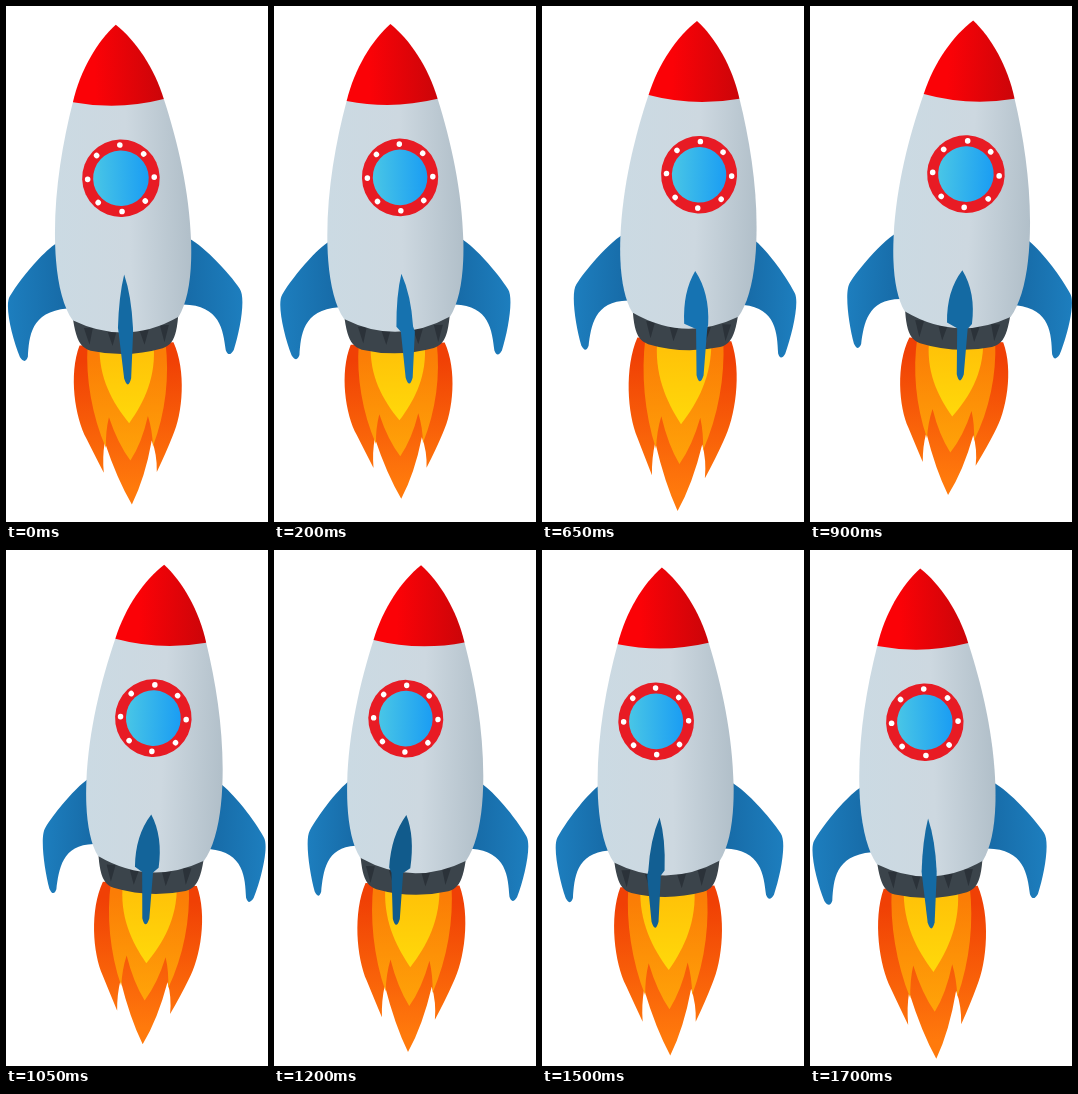
Animation, 262 px wide and 516 px high, one loop 1.75 s. Source, as an HTML page:

```html
<!DOCTYPE html>
<html lang="en">
<head>
<meta charset="utf-8">
<title>Rocket</title>
<style>
  html, body { margin: 0; width: 100%; height: 100%; overflow: hidden; background: #fff; }
  svg { display: block; width: 100vw; height: 100vh; }
</style>
</head>
<body>
<svg viewBox="0 0 262 516">
  <defs>
    <linearGradient id="hull"><stop stop-color="#cbdae3"/><stop offset=".55" stop-color="#cdd8e0"/><stop offset="1" stop-color="#b1bfc9"/></linearGradient>
    <linearGradient id="red"><stop offset=".25" stop-color="#fb0207"/><stop offset="1" stop-color="#cb0509"/></linearGradient>
    <linearGradient id="glass"><stop stop-color="#49c6e6"/><stop offset="1" stop-color="#1a9df3"/></linearGradient>
    <linearGradient id="blue"><stop stop-color="#1565a0"/><stop offset="1" stop-color="#1d7ebe"/></linearGradient>
    <linearGradient id="fire" x2="0" y2="1"><stop offset=".1" stop-color="#f04005"/><stop offset=".9" stop-color="#ff7a0c"/></linearGradient>
    <linearGradient id="glow" x2="0" y2="1"><stop offset=".1" stop-color="#fb7d06"/><stop offset="1" stop-color="#ffa408"/></linearGradient>
    <linearGradient id="core" x2="0" y2="1"><stop offset=".1" stop-color="#ffc208"/><stop offset="1" stop-color="#ffd90a"/></linearGradient>
    <path id="sideFin" fill="url(#blue)" d="M-15 232H9C24 241 48 268 58 284C64 293 57 326 50 345Q45 353 42 345C40 325 38 300 1 298H-15Z"/>
  </defs>
  <g id="rocket">
    <g id="flame">
      <path fill="url(#fire)" d="M-47 335C-59 365 -54 410 -43 433Q-36 449 -27 469Q-28 452 -25 437Q-14 476 0 503Q14 476 22 437Q27 452 26 470Q36 450 43 433C54 410 59 365 47 335Z"/>
      <path fill="url(#glow)" d="M-39 335C-42 370 -37 408 -24 443Q-24 426 -20 411Q-12 439 0 457Q12 439 19 411Q23 426 23 443C37 408 42 370 39 335Z"/>
      <path fill="url(#core)" d="M-27 335C-29 370 -16 396 0 418C16 396 29 370 27 335Z"/>
    </g>
    <path fill="#3b444b" d="M-53 305Q-51 328 -45 335Q-42 339 -36 341Q0 350 36 341Q42 339 45 335Q51 328 53 305Z"/>
    <path id="teeth" fill="#2b3239" d="M-42 318h9l-4 17zM-19 321h10l-5 16zM13 321h10l-5 16zM34 318h9l-5 17z"/>
    <use id="leftFin" href="#sideFin"/>
    <use id="rightFin" href="#sideFin"/>
    <path fill="url(#hull)" d="M-45.5 92C-58 135 -68 185 -68 235C-68 268 -63 295 -53 310Q0 338 53 310C63 295 68 268 68 235C68 185 58 135 45.5 92Z"/>
    <path fill="url(#red)" d="M0 16C-19 32 -37 60 -45.5 92Q0 102 45.5 92C37 60 19 32 0 16Z"/>
    <g id="port">
      <circle r="38.8" fill="#e81b24"/>
      <circle r="27.8" fill="url(#glass)"/>
      <g id="rivets" fill="#fff"></g>
    </g>
    <path id="frontFin"/>
  </g>
</svg>
<script>
const LOOP = 1750, STEP = 50, PIVOT_Y = 634, FLICKER = 175;

const $ = id => document.getElementById(id);
const place = (id, transform) => $(id).setAttribute('transform', transform);

$('rivets').innerHTML = Array.from({ length: 8 }, (_, i) =>
  `<circle r="2.8" cy="-33.3" transform="rotate(${i * 45})"/>`).join('');

// Quadratic segment from a to b passing through mid.
function bend(a, mid, b) {
  const control = mid.map((m, k) => 2 * m - (a[k] + b[k]) / 2);
  return `Q${control} ${b}`;
}

// Each point slides sideways from its rest place with the spin and the lean.
function finPath(spin, lean) {
  const point = (x, y, bySpin, byLean) => [x + spin * bySpin + lean * byLean, y];
  const top = point(0, 266, 11.5, 2.5);
  const leftEdge = point(-5, 290, 14.5, -3), rightEdge = point(5, 290, 15, 8);
  const leftCorner = point(-8, 319, 17, -2), rightCorner = point(7, 319, 18, 8);
  const leftNotch = point(-7.5, 324, 23, 8), rightNotch = point(7, 324, 23, 4);
  const leftTail = point(-3.5, 370, 23, 6), rightTail = point(3.5, 370, 23, 6);
  const tip = point(0, 376, 23, 6);
  return `M${top}${bend(top, leftEdge, leftCorner)}L${leftNotch} ${leftTail}`
    + `${bend(leftTail, tip, rightTail)}L${rightNotch} ${rightCorner}${bend(rightCorner, rightEdge, top)}Z`;
}

function draw(t) {
  const turn = 2 * Math.PI * t / LOOP;
  const spin = Math.sin(turn) * Math.abs(Math.sin(turn));
  const lean = (1 - Math.cos(turn)) / 2;
  const tilt = -1.92 + 4.96 * lean;
  const bob = 2.3 * Math.cos(turn);
  const flameLength = 153.5 - 8 * Math.cos(2 * Math.PI * (t - 35) / FLICKER);
  const leftSpan = 1 - 0.1 * lean - 0.14 * Math.max(-spin, 0);
  const rightSpan = 1 - 0.06 * lean - 0.12 * Math.max(spin, 0);

  place('rocket', `translate(130.5 ${PIVOT_Y + bob}) rotate(${tilt}) translate(0 ${-PIVOT_Y})`);
  place('flame', `translate(0 345) scale(1 ${flameLength / 158}) translate(0 -345)`);
  place('teeth', `translate(${spin * 6})`);
  place('leftFin', `translate(-57) scale(${-leftSpan} 1)`);
  place('rightFin', `translate(57) scale(${rightSpan} 1)`);
  place('port', `translate(${14 * spin + lean} 169.7) scale(${1 - 0.04 * Math.abs(spin)} 1)`);
  $('frontFin').setAttribute('d', finPath(spin, lean));
  $('frontFin').setAttribute('fill', `hsl(204, 78%, ${36 + 6 * spin}%)`);
}

const start = performance.now();
function tick() {
  const elapsed = (performance.now() - start) % LOOP;
  draw(Math.floor(elapsed / STEP) * STEP);
  requestAnimationFrame(tick);
}
tick();
</script>
</body>
</html>
```
